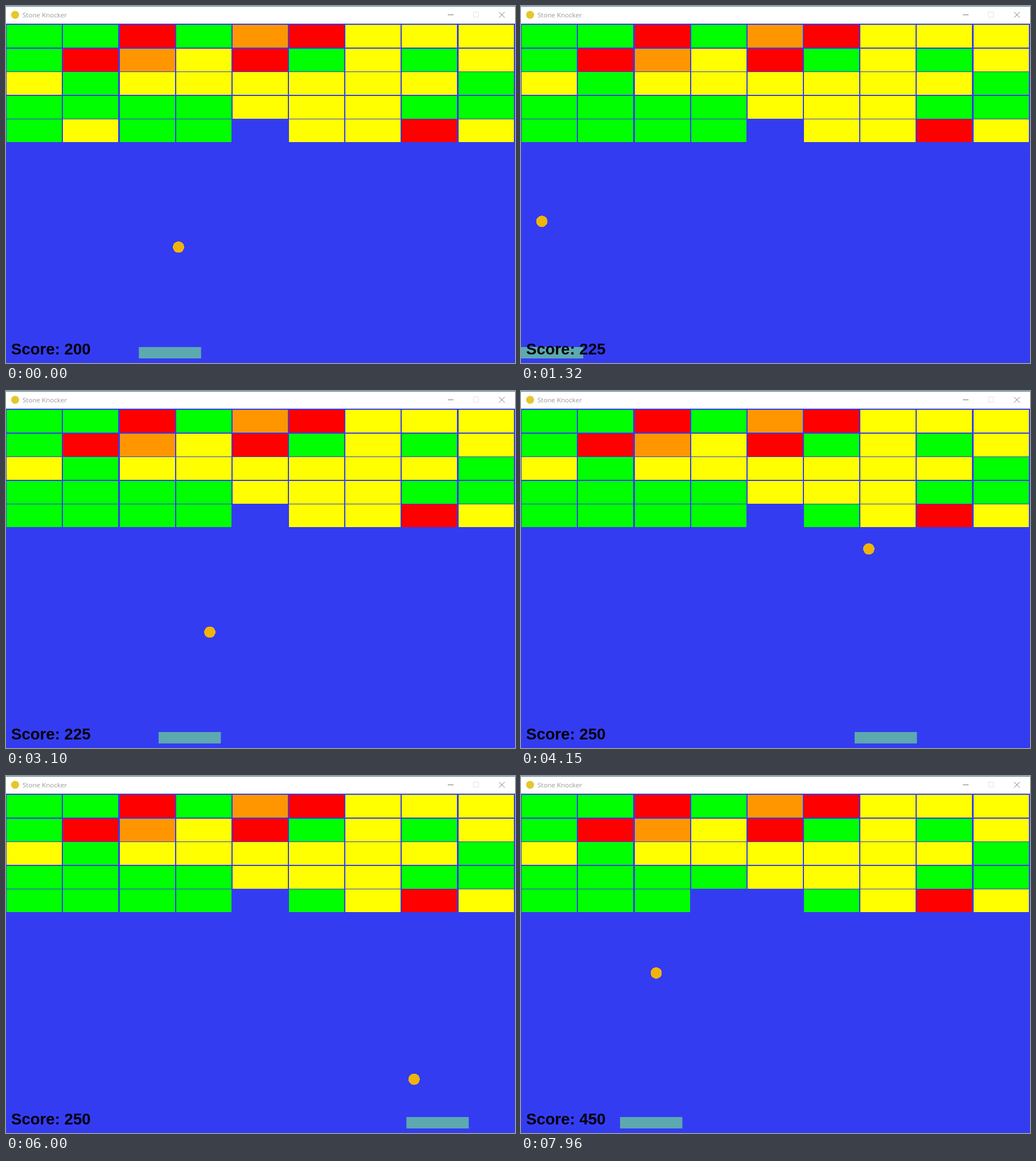
An HTML page for the animation above (8 s loop, 894x627 px).

```html
<!DOCTYPE html>
<html lang="en">
<head>
<meta charset="utf-8">
<title>Stone Knocker</title>
<style>
  html, body { margin: 0; width: 100%; height: 100%; overflow: hidden; background: #343cf1; }
  svg { display: block; width: 100%; height: 100%; }
  .title { font: 11.6px "Open Sans", sans-serif; fill: #999; }
  .score { font: bold 27.6px "Liberation Sans", Arial, sans-serif; }
</style>
</head>
<body>
<svg viewBox="0 0 894 627">
  <rect width="894" height="627" fill="#343cf1"/>
  <rect width="894" height="31" fill="#fff"/>
  <rect width="894" height="1" fill="#3f7586"/>
  <circle cx="16" cy="15.5" r="7" fill="#e6c62c"/>
  <text class="title" x="29" y="20">Stone Knocker</text>
  <g fill="none">
    <path d="M776 15.5h10" stroke="#777"/>
    <path d="M821 10.5h9v9h-9z" stroke="#e2e2e2"/>
    <path d="M866 10.5l10 10m0-10l-10 10" stroke="#777"/>
  </g>
  <g id="wall"></g>
  <rect id="paddle" y="599" width="109.4" height="20" fill="#5ca9b0"/>
  <circle id="ball" r="10" fill="#f0b40a" shape-rendering="crispEdges"/>
  <text id="score" class="score" x="9" y="612"></text>
</svg>
<script>
const LOOP = 8000, STEP = 65.8, LAST = 121, PITCH = 99.15;
const COLORS = { G: '#0f0', R: '#f00', O: '#ff9600', Y: '#ff0', '-': 'none' };
const ROWS = ['GGRGORYYY', 'GROYRGYGY', 'YGYYYYYYG', 'GGGGYYYGG', 'GYGG-YYRY'];
const BOTTOM = ROWS.length - 1;

// What a hit block turns into, and the points it gives
const HIT = { Y: ['G', 25], G: ['-', 200] };

// The ball runs straight between bounces: [step, x, y]
const BALL = [[0, 303, 423.4], [11.5, 149.8, 250], [22.6, 2, 417.5], [34, 152.6, 589], [60.8, 576, 248],
  [80.3, 885.5, 508], [86.6, 787, 589], [113.2, 363, 248], [LAST, 237.5, 346]];

// The paddle follows, resting at both sides: [step, x]
const PADDLE = [[0, 233.3], [16.1, 0], [29.5, 0], [47, 268], [63, 586],
  [73.5, 785], [86, 785], [107, 442], [LAST, 174]];

const $ = id => document.getElementById(id);
const wall = $('wall'), paddle = $('paddle'), ball = $('ball'), score = $('score');

function set(el, attrs) {
  for (const name in attrs) el.setAttribute(name, attrs[name]);
  return el;
}

const blocks = ROWS.map((row, r) => [...row].map((kind, c) => {
  const block = document.createElementNS(wall.namespaceURI, 'rect');
  return wall.appendChild(set(block, {
    x: Math.round(1.3 + PITCH * c), y: Math.round(33 + 41.6 * r),
    width: 97, height: 40, fill: COLORS[kind]
  }));
}));

function along(keys, k) {
  const i = Math.max(1, keys.findIndex(key => key[0] >= k));
  const a = keys[i - 1], b = keys[i], f = (k - a[0]) / (b[0] - a[0]);
  return a.map((v, j) => v + (b[j] - v) * f);
}

function draw(time) {
  const k = Math.min(LAST, Math.max(0, Math.floor((time - 70) / STEP + 1.1)));
  const [, cx, cy] = along(BALL, k);
  set(ball, { cx, cy });
  set(paddle, { x: along(PADDLE, k)[1] });

  const row = [...ROWS[BOTTOM]];
  let points = 200;
  for (const [step, x, y] of BALL) {
    if (step > k || y > 250) continue;
    const col = Math.floor(x / PITCH);
    const [left, gain] = HIT[row[col]];
    row[col] = left;
    points += gain;
  }
  row.forEach((kind, c) => set(blocks[BOTTOM][c], { fill: COLORS[kind] }));
  score.textContent = 'Score: ' + points;
}

const start = performance.now();
function tick() {
  draw((performance.now() - start) % LOOP);
  requestAnimationFrame(tick);
}
tick();
</script>
</body>
</html>
```
